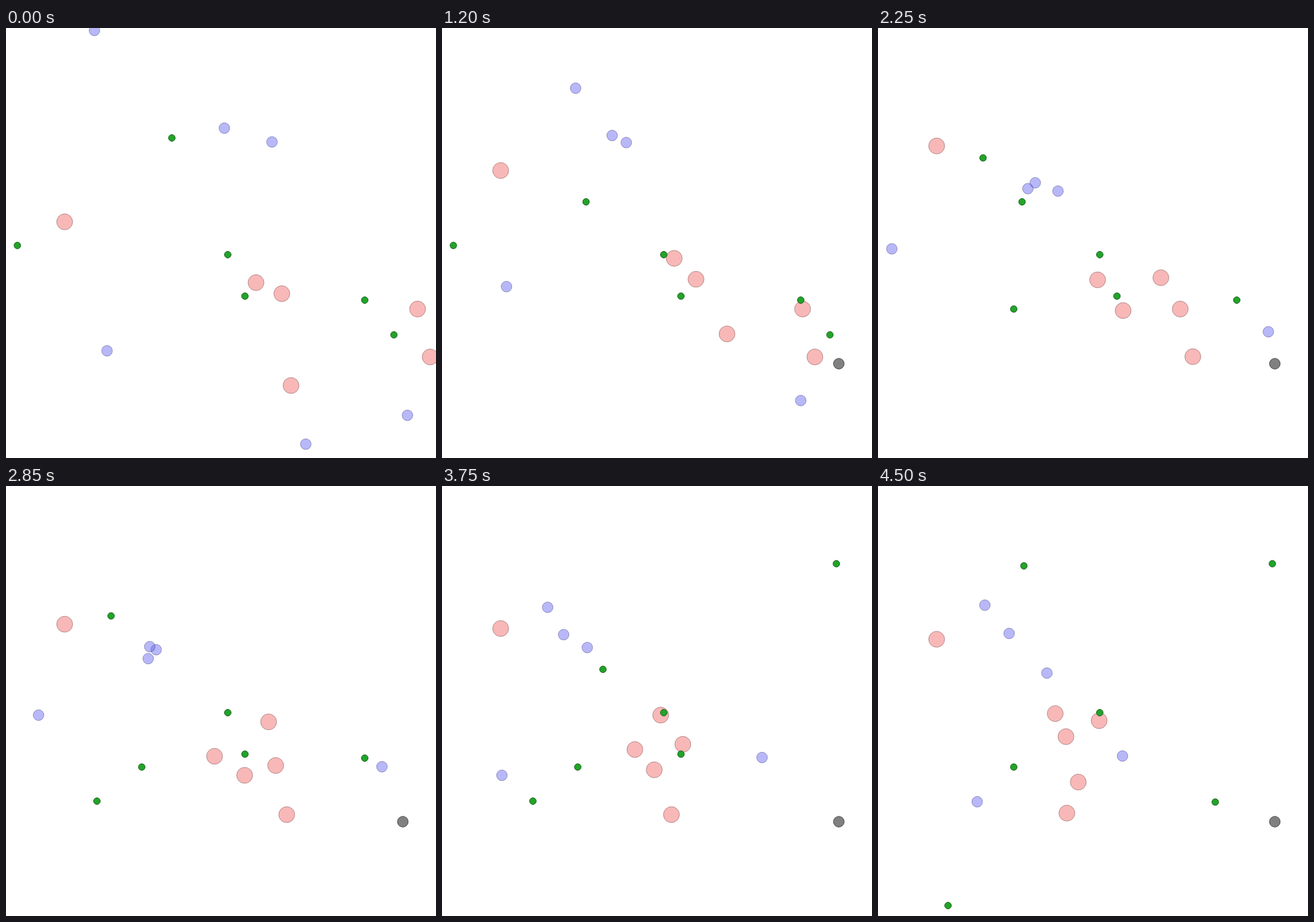
These frames come from a looping animation (700 by 700 pixels, 4.65 s). An HTML page with a canvas:

```html
<!DOCTYPE html>
<html lang="en">
<head>
<meta charset="utf-8">
<title>Flocks</title>
<style>
html, body { margin: 0; width: 100%; height: 100%; overflow: hidden; background: #fff; }
canvas { display: block; width: 700px; height: 700px; }
</style>
</head>
<body>
<canvas id="stage" width="700" height="700"></canvas>
<script>
const ctx = document.getElementById('stage').getContext('2d');
const STEP = 150, STEPS = 31;
const BEATS = [0, 4, 8, 15, 19, 25, 30];

const STYLE = {
  hunter: { r: 13, fill: 'rgba(240,100,100,.46)', line: 'rgba(90,40,40,.42)' },
  grazer: { r: 8.7, fill: 'rgba(100,100,240,.46)', line: 'rgba(40,40,110,.42)' },
  dead: { r: 8.7, fill: '#808080', line: '#484848' },
  food: { r: 5.4, fill: '#22a428', line: '#175c1a' }
};

// Points [x, y] on the shared beats; extra ones are [x, y, step].
function track(points, extras = []) {
  return points.map(([x, y], i) => ({ t: BEATS[i], x, y }))
    .concat(extras.map(([x, y, t]) => ({ t, x, y })))
    .sort((a, b) => a.t - b.t);
}

const hunters = [
  track([315.5, 281, 232, 192, 225, 232, 249.5].map(y => [95.5, y]), [[95.5, 187, 14]]),
  track([[407, 414.5], [394, 397], [378, 375], [357.5, 410], [339.5, 440], [314, 429], [306, 408]]),
  track([[449, 432.5], [432, 422], [413.5, 409], [399, 460], [388.5, 471], [345.5, 462], [326, 482]]),
  track([[670, 457.5], [636, 457.5], [587, 457.5], [492, 457.5], [439, 455], [392, 420.5], [360, 382]]),
  track([[690.5, 535.5], [656, 535.5], [607, 535.5], [512.5, 535], [457, 535], [373.5, 535], [307.5, 532.5]]),
  track([[464, 582], [464, 547.5], [464, 498], [460.5, 406.5], [427.5, 384], [356, 373], [288.5, 370.5]])
];

const grazers = [
  track([[144, 4], [177.5, 39.5], [217.5, 98], [244, 261.5], [231.5, 281], [236.5, 263], [275, 304.5]]),
  track([[355.5, 163], [307, 175], [277, 175], [293, 265.5], [244.5, 266.5], [198, 242], [213.5, 240]]),
  track([[433, 185.5], [364.5, 185.5], [300, 186.5], [256, 252], [234, 261.5], [172, 197.5], [174, 194]]),
  track([[164.5, 525.5], [148.5, 473], [105, 421], [22.5, 359.5], [53, 373], [97.5, 471], [161.5, 514]],
    [[21, 357.5, 16], [70, 402, 21]]),
  track([[488, 677.5], [538.5, 659], [584, 606.5], [635.5, 494.5], [612, 457], [521, 442], [398, 439.5]],
    [[640, 482, 16], [593, 447, 22], [449, 440, 28]])
];

const prey = [{ t: 0, x: 653.5, y: 630.5 }, { t: 4, x: 652, y: 563 }, { t: 5, x: 646, y: 546.5 }];

// Each patch of food: [x, y, first step, step when eaten].
const food = [
  [270, 179, 0, 8], [234.5, 283, 8, 19], [148, 513, 19, 28], [114, 683, 28],
  [18.5, 354, 0, 14], [221, 457.5, 14],
  [631.5, 499.5, 0, 15], [171, 211.5, 15, 24], [262, 298.5, 24, 28], [549, 514.5, 28],
  [584, 443, 0, 22], [642, 126.5, 22],
  [361, 369], [389, 436.5, 0, 30], [237.5, 130, 30]
];

function slope(keys, i, axis) {
  const rate = j => (keys[j + 1][axis] - keys[j][axis]) / (keys[j + 1].t - keys[j].t);
  const mid = j => {
    const a = keys[j].t - keys[j - 1].t, b = keys[j + 1].t - keys[j].t;
    return (rate(j - 1) * b + rate(j) * a) / (a + b);
  };
  const last = keys.length - 1;
  if (i === 0) return 2 * rate(0) - mid(1);
  if (i === last) return 2 * rate(last - 1) - mid(last - 1);
  return mid(i);
}

// Smooth curve through the keys, with uneven spacing in time.
function at(keys, t, axis) {
  let i = 0;
  while (i < keys.length - 2 && t >= keys[i + 1].t) i++;
  const a = keys[i], b = keys[i + 1], h = b.t - a.t;
  const u = Math.min(1, (t - a.t) / h), v = 1 - u;
  return v * v * (1 + 2 * u) * a[axis] + u * u * (1 + 2 * v) * b[axis]
    + h * u * v * (v * slope(keys, i, axis) - u * slope(keys, i + 1, axis));
}

function dot(x, y, style) {
  ctx.beginPath();
  ctx.arc(x, y, style.r, 0, Math.PI * 2);
  ctx.fillStyle = style.fill;
  ctx.fill();
  ctx.strokeStyle = style.line;
  ctx.lineWidth = 1;
  ctx.stroke();
}

function draw(step) {
  ctx.fillStyle = '#fff';
  ctx.fillRect(0, 0, 700, 700);
  const mover = (keys, style) => dot(at(keys, step, 'x'), at(keys, step, 'y'), style);
  hunters.forEach(k => mover(k, STYLE.hunter));
  grazers.forEach(k => mover(k, STYLE.grazer));
  mover(prey, step < 5 ? STYLE.grazer : STYLE.dead);
  for (const [x, y, from = 0, to = STEPS] of food) {
    if (step >= from && step < to) dot(x, y, STYLE.food);
  }
}

let start = null;
function tick(now) {
  if (start === null) start = now;
  draw(Math.floor((now - start) / STEP) % STEPS);
  requestAnimationFrame(tick);
}
draw(0);
requestAnimationFrame(tick);
</script>
</body>
</html>
```
